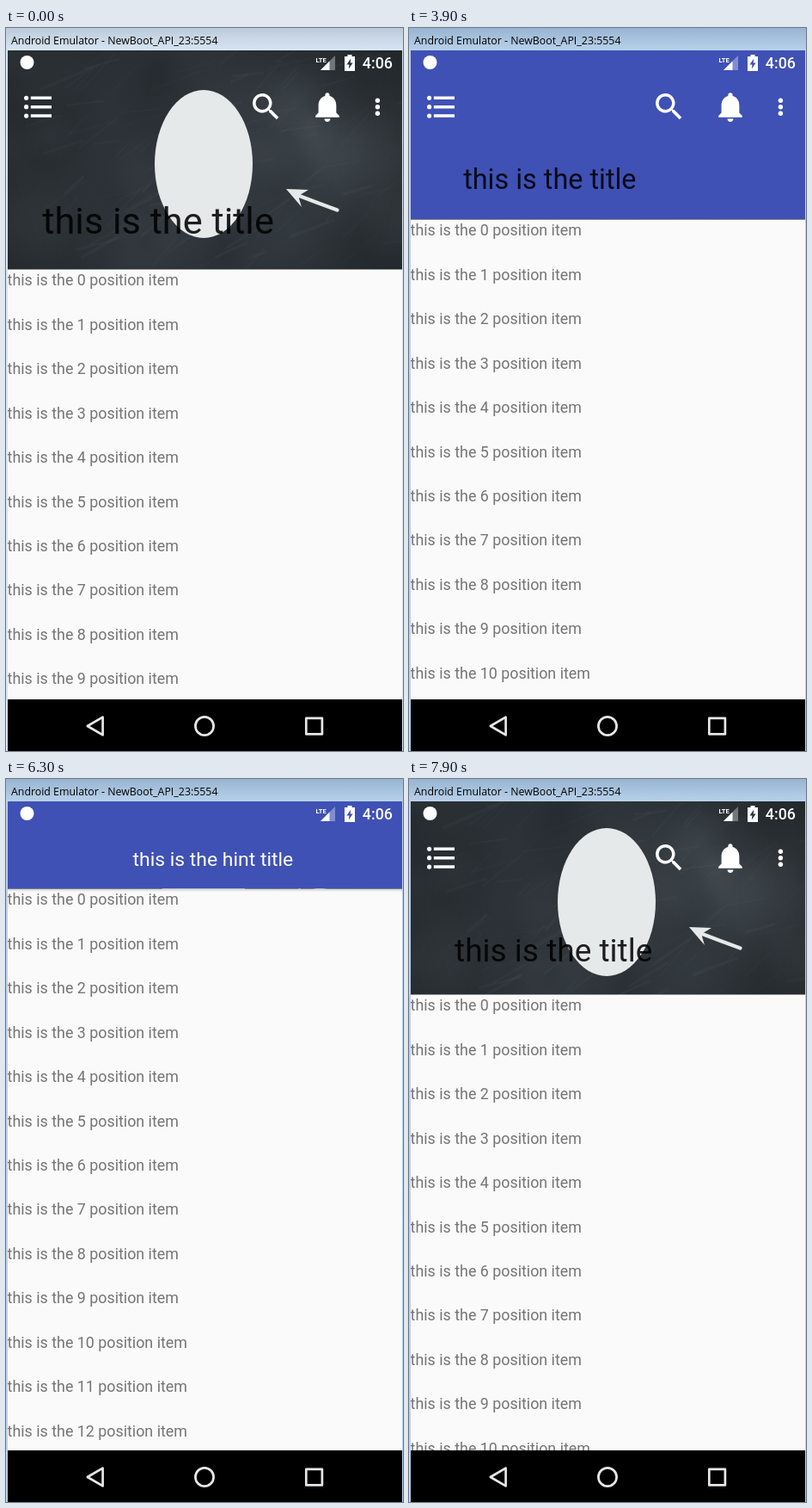
An HTML page with a canvas that plays this animation: 462x840 px, repeating every 8000 ms.

```html
<!DOCTYPE html>
<html lang="en">
<head>
<meta charset="utf-8">
<title>Collapsing header</title>
<style>
html, body { margin: 0; width: 100%; height: 100%; overflow: hidden; background: #fafafa; }
canvas { display: block; width: 462px; height: 840px; }
</style>
</head>
<body>
<canvas id="stage" width="462" height="840"></canvas>
<script>
const ctx = document.getElementById('stage').getContext('2d');
const LOOP = 8000, STEP = 100;
const LEFT = 2, RIGHT = 461, TOP = 26, BOTTOM = 780, WIDTH = RIGHT - LEFT;
const OPEN = 280.5, RANGE = 153;
const BLUE = '#3f51b5', WHITE = '#fff', FONT = 'Roboto, sans-serif';

// time and distance the header is pushed up
const scroll = [
  [0, 0], [1700, 0], [1800, 56], [1900, 100], [2000, 145], [2100, RANGE],
  [3800, RANGE], [3900, 58], [4000, 10], [4100, 0],
  [5500, 0], [5600, 16], [5700, 48], [5800, 57], [5900, 63], [6000, 110], [6100, 147], [6200, RANGE],
  [6700, RANGE], [6800, 130], [6900, 80], [7000, 0],
  [7600, 0], [7700, 4], [7800, 16], [7900, 30], [8000, 30]
];
// time and direction of each scrim fade
const fades = [[1790, 1], [3920, 0], [5700, 1], [6955, 0]];

const lerp = (a, b, k) => a + (b - a) * k;

function pushAt(t) {
  const i = scroll.findIndex(p => p[0] > t);
  const [t0, d0] = scroll[i - 1], [t1, d1] = scroll[i];
  return lerp(d0, d1, (t - t0) / (t1 - t0));
}

function bezier(x1, y1, x2, y2, x) {
  const at = (a, b, s) => 3 * (1 - s) * (1 - s) * s * a + 3 * (1 - s) * s * s * b + s * s * s;
  let lo = 0, hi = 1;
  for (let i = 0; i < 24; i++) {
    const mid = (lo + hi) / 2;
    if (at(x1, x2, mid) < x) lo = mid; else hi = mid;
  }
  return at(y1, y2, lo);
}

function scrimAt(t) {
  const fade = fades.filter(f => f[0] <= t).pop();
  if (!fade) return 0;
  const k = Math.min(1, (t - fade[0]) / 600);
  return fade[1] ? bezier(0.4, 0, 1, 1, k) : 1 - bezier(0, 0, 0.2, 1, k);
}

function rect(x, y, w, h, fill) {
  ctx.fillStyle = fill;
  ctx.fillRect(x, y, w, h);
}

function disc(x, y, r, fill) {
  ctx.fillStyle = fill;
  ctx.beginPath();
  ctx.arc(x, y, r, 0, 7);
  ctx.fill();
}

function poly(points, fill, c = ctx) {
  c.fillStyle = fill;
  c.beginPath();
  points.forEach(p => c.lineTo(...p));
  c.closePath();
  c.fill();
}

function text(str, x, y, size, fill, weight = 400, family = FONT) {
  ctx.font = `${weight} ${size}px ${family}`;
  ctx.fillStyle = fill;
  ctx.fillText(str, x, y);
}

function vertical(y0, y1, a, b) {
  const g = ctx.createLinearGradient(0, y0, 0, y1);
  g.addColorStop(0, a);
  g.addColorStop(1, b);
  return g;
}

// Blackboard with chalk smudges, drawn once
function makeBoard() {
  const board = document.createElement('canvas');
  const h = Math.ceil(OPEN - TOP);
  board.width = WIDTH;
  board.height = h;
  const c = board.getContext('2d');
  let seed = 11;
  const rnd = () => (seed = seed * 16807 % 2147483647) / 2147483647;

  c.fillStyle = '#2c3237';
  c.fillRect(0, 0, WIDTH, h);

  for (let i = 0; i < 45; i++) {
    const x = rnd() * WIDTH, y = rnd() * h, r = 25 + rnd() * 60;
    const g = c.createRadialGradient(x, y, 0, x, y, r);
    const tone = rnd() < 0.6 ? '130,142,150' : '10,13,16';
    g.addColorStop(0, `rgba(${tone},.08)`);
    g.addColorStop(1, `rgba(${tone},0)`);
    c.fillStyle = g;
    c.fillRect(x - r, y - r, r * 2, r * 2);
  }
  c.lineCap = 'round';
  for (let i = 0; i < 130; i++) {
    const x = rnd() * WIDTH, y = rnd() * h, len = 15 + rnd() * 50, a = -0.9 + rnd() * 0.8;
    c.strokeStyle = `rgba(170,180,188,${0.01 + rnd() * 0.03})`;
    c.lineWidth = 1 + rnd() * 3;
    c.beginPath();
    c.moveTo(x, y);
    c.lineTo(x + Math.cos(a) * len, y + Math.sin(a) * len);
    c.stroke();
  }
  const shade = c.createRadialGradient(230, 130, 130, 230, 130, 290);
  shade.addColorStop(0, 'rgba(0,0,0,0)');
  shade.addColorStop(1, 'rgba(0,0,0,.28)');
  c.fillStyle = shade;
  c.fillRect(0, 0, WIDTH, h);

  c.translate(-LEFT, -TOP);
  const chalk = '#e6e9e9';
  c.fillStyle = c.strokeStyle = chalk;
  c.beginPath();
  c.ellipse(230, 158, 57, 86, 0, 0, 7);
  c.fill();

  // chalk arrow
  c.lineWidth = 4.2;
  c.beginPath();
  c.moveTo(385.5, 211.5);
  c.quadraticCurveTo(362, 203, 336, 193);
  c.stroke();
  poly([[326, 187], [352, 188], [342, 194], [341, 198], [344, 208]], chalk, c);
  return board;
}
const board = makeBoard();

function drawWindow(active) {
  const [dark, light] = active ? ['#98b4d2', '#b9d1ea'] : ['#bccbdb', '#d7e4f2'];
  rect(0, 0, 462, 840, light);
  rect(0, 0, 462, TOP, vertical(0, TOP, dark, light));
  text('Android Emulator - NewBoot_API_23:5554', 6, 19, 12.35, '#000', 400, '"Open Sans", sans-serif');
}

function drawList(edge) {
  rect(LEFT, TOP, WIDTH, BOTTOM - TOP, '#fafafa');
  for (let i = 0; i < 13; i++) {
    text(`this is the ${i} position item`, 1.6, edge + 18.9 + i * 51.43, 17.85, '#757575');
  }
}

function drawHeader(push, scrim) {
  const edge = OPEN - push;
  ctx.save();
  ctx.beginPath();
  ctx.rect(LEFT, TOP, WIDTH, edge - TOP);
  ctx.clip();
  ctx.drawImage(board, LEFT, TOP - push / 2);
  ctx.globalAlpha = scrim;
  rect(LEFT, TOP, WIDTH, edge - TOP, BLUE);
  ctx.restore();

  if (push >= RANGE) {
    rect(LEFT, edge, WIDTH, 4, vertical(edge, edge + 4, 'rgba(0,0,0,.16)', 'rgba(0,0,0,0)'));
    text('this is the hint title', 147.5, 100.5, 22.95, WHITE);
    return;
  }
  const k = push / RANGE;
  const size = lerp(43.35, 25.5, 1 - (1 - k) * (1 - k));
  text('this is the title', 42.3 + 55 * k, 239.2 - 137 * k, size, 'rgba(0,0,0,.87)');
  drawTools();
}

// Toolbar icons on a 24-unit grid
const icons = [
  [16.7, 'M2.5 6a1.5 1.5 0 1 0 3 0a1.5 1.5 0 1 0-3 0zm0 6a1.5 1.5 0 1 0 3 0a1.5 1.5 0 1 0-3 0z' +
    'm0 6a1.5 1.5 0 1 0 3 0a1.5 1.5 0 1 0-3 0zM7 5h14v2H7zm0 6h14v2H7zm0 6h14v2H7z'],
  [281.9, 'M15.5 14h-.8l-.3-.3A6.5 6.5 0 1 0 13.7 14.4l.3.3v.8l5 5L20.5 19zm-6 0a4.5 4.5 0 1 1 0-9a4.5 4.5 0 1 1 0 9z'],
  [353.2, 'M12 22c1.1 0 2-.9 2-2h-4c0 1.1.9 2 2 2zm6-6v-5c0-3.1-1.6-5.6-4.5-6.3V4a1.5 1.5 0 0 0-3 0v.7' +
    'C7.6 5.4 6 7.9 6 11v5l-2 2v1h16v-1z']
].map(([x, d]) => [x, new Path2D(d)]);

function drawTools() {
  ctx.fillStyle = WHITE;
  for (const [x, path] of icons) {
    ctx.save();
    ctx.translate(x, 70.9);
    ctx.scale(1.73, 1.73);
    ctx.fill(path, 'evenodd');
    ctx.restore();
  }
  for (const y of [84.2, 91.7, 99.2]) disc(432.4, y, 2.7, WHITE);
}

function drawStatus(back) {
  disc(24.5, 40, 8, WHITE);
  poly([[383, 32], [383, 49], [366, 49]], 'rgba(255,255,255,.35)');
  poly([[376.5, 38.5], [376.5, 49], [366, 49]], WHITE);
  text('LTE', 360.5, 39.5, 7.6, WHITE, 700);

  rect(397.5, 31, 5, 3, WHITE);
  rect(394, 33, 12, 17, WHITE);
  poly([[401.3, 35.5], [396.5, 42.5], [399.4, 42.5], [398.8, 47.5], [403.6, 40.5], [400.7, 40.5]], back);
  text('4:06', 414.8, 47, 17.85, WHITE, 500);
}

function drawNav() {
  rect(LEFT, BOTTOM, WIDTH, 60, '#000');
  ctx.strokeStyle = '#e6e6e6';
  ctx.lineWidth = 2.7;
  ctx.lineJoin = 'round';
  ctx.beginPath();
  ctx.moveTo(94.8, 811);
  ctx.lineTo(112.6, 800.6);
  ctx.lineTo(112.6, 821.4);
  ctx.closePath();
  ctx.stroke();
  ctx.beginPath();
  ctx.arc(231, 811, 10.6, 0, 7);
  ctx.stroke();
  ctx.strokeRect(349.3, 801.8, 18.6, 18.6);
}

function draw(t) {
  const push = pushAt(t), scrim = scrimAt(t);
  drawWindow(t >= 1500);
  ctx.save();
  ctx.beginPath();
  ctx.rect(LEFT, TOP, WIDTH, BOTTOM - TOP);
  ctx.clip();
  drawList(OPEN - push);
  drawHeader(push, scrim);
  drawStatus(scrim > 0.5 ? BLUE : '#2c3237');
  ctx.restore();
  drawNav();
}

const start = performance.now();
function tick() {
  const t = (performance.now() - start) % LOOP;
  draw(Math.floor(t / STEP) * STEP);
  requestAnimationFrame(tick);
}
tick();
</script>
</body>
</html>
```
